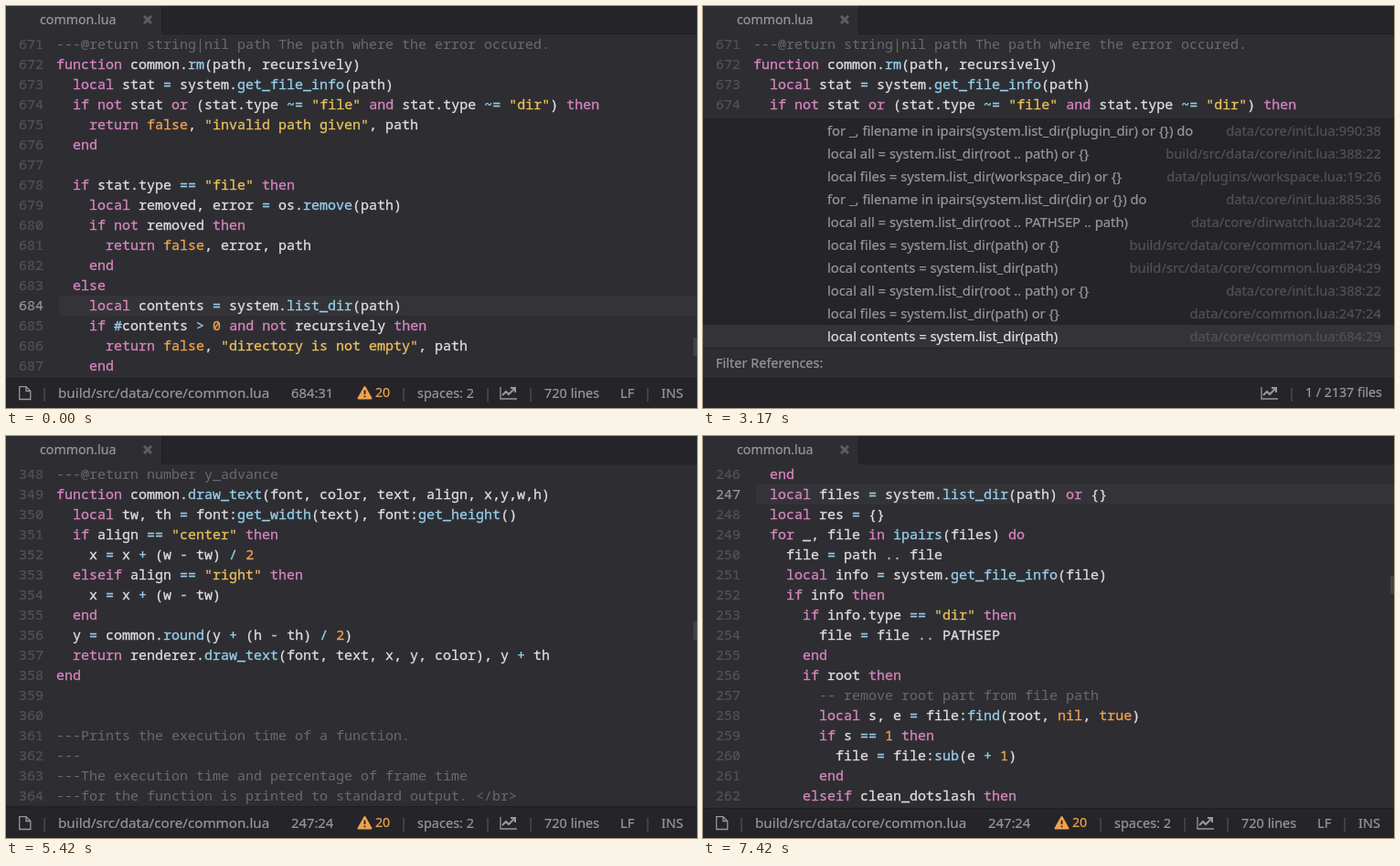
Write an HTML page that moves like this. It is 756x440 px and loops after 7500 ms.

```html
<!DOCTYPE html>
<html lang="en">
<head>
<meta charset="utf-8">
<title>Find references in a code editor</title>
<style>
  html, body { margin: 0; width: 100%; height: 100%; overflow: hidden; background: #2e2e32; }
  #stage { position: relative; width: 756px; height: 440px; overflow: hidden; background: #2e2e32;
    color: #97979c; font: 14.8px/20px "Noto Sans", "Open Sans", sans-serif; white-space: pre;
    -webkit-text-stroke-width: .2px; }
  #stage div, #stage svg, .at { position: absolute; }
  #view { left: 0; top: 31px; width: 756px; height: 376px; overflow: hidden; }
  #doc { left: 0; top: 0; width: 756px; font: 15px/20px "Noto Sans Mono", "DejaVu Sans Mono", monospace; color: #dedee3; }
  .num { left: 14px; color: #525259; }
  .num.on { color: #97979c; }
  .code { left: 55px; -webkit-text-stroke-width: .3px; }
  .band { left: 58px; right: 0; height: 22px; background: #343438; }
  .caret { width: 2px; height: 20px; background: #93ddfa; }
  .comment { color: #676b6f; -webkit-text-stroke-width: 0; }
  .string { color: #ecc05c; } .keyword { color: #d985c0; }
  .literal { color: #f0a34e; } .call, .op { color: #97cfec; }
  #thumb { right: 0; width: 4px; height: 20px; background: #414146; }
  #tabs { left: 0; top: 0; width: 756px; height: 31px; background: #252529; box-shadow: inset 0 -1px #202024; }
  #tab { left: 0; top: 0; width: 170px; height: 31px; background: #2e2e32; border-right: 1px solid #202024; font-size: 14.2px; }
  #list, #bar { left: 0; width: 756px; overflow: hidden; }
  #list { background: #252529; box-shadow: inset 0 1px #202024; }
  #rows { left: 0; bottom: 0; width: 756px; height: 250px; }
  #pick { left: 0; width: 756px; height: 25px; background: #343438; }
  .row { left: 136px; right: 14px; height: 25px; line-height: 24px; }
  .row.on { color: #e1e1e6; }
  .row .place { top: 0; right: 0; color: #525257; }
  #bar { background: #2e2e32; box-shadow: inset 0 1px #202024; }
  #label { left: 14px; top: 6px; font-size: 14.5px; }
  #query { left: 136px; top: 6px; color: #e1e1e6; }
  #query .caret { left: 100%; top: 0; height: 22px; }
  #status { left: 0; top: 407px; width: 756px; height: 33px; background: #252529; box-shadow: inset 0 1px #202024; }
  #status .at { top: 6px; }
  .sep { color: #525257; }
  svg { fill: none; stroke: #97979c; stroke-width: 1.5; }
</style>
</head>
<body>
<div id="stage">
  <div id="view"><div id="doc"></div><div id="thumb"></div></div>
  <div id="tabs"><div id="tab">
    <span class="at" style="left:37px;top:5px">common.lua</span>
    <svg style="left:150px;top:10px;stroke:#5d5d62;stroke-width:3" width="10" height="10"><path d="M1 1 9 9M9 1 1 9"/></svg>
  </div></div>
  <div id="list"><div id="rows"><div id="pick"></div></div></div>
  <div id="bar">
    <div id="label">Filter References:</div>
    <div id="query"><span id="typed"></span><div class="caret" id="barCaret"></div></div>
  </div>
  <div id="status"><div id="fileInfo"></div><div id="searchInfo"></div></div>
</div>
<script>
const LOOP = 7500, FPS = 12, TAU = 47, LINE = 22, ROW = 25;
const OPEN = 2800, CLOSE = 5275, JUMP = 5349.6;
const FIRST = 246, LAST = 671;
const BLINK = 667;
// [time, selected row]
const PRESSES = [[3640, 8], [3850, 7], [4060, 6], [4300, 5], [4490, 4], [4740, 5]];
// caret phases in the first view: [on, off]
const CARET_ON = [[500, 830], [1830, 2170], [2500, 2830]];

const CODE = {
246: `  end
  local files = system.list_dir(path) or {}
  local res = {}
  for _, file in ipairs(files) do
    file = path .. file
    local info = system.get_file_info(file)
    if info then
      if info.type == "dir" then
        file = file .. PATHSEP
      end
      if root then
        -- remove root part from file path
        local s, e = file:find(root, nil, true)
        if s == 1 then
          file = file:sub(e + 1)
        end
      elseif clean_dotslash then
        -- remove added dot slash
        local s, e = file:find("." .. PATHSEP, nil, true)
        if s == 1 then
          file = file:sub(e + 1)
        end
      end
      if file:lower():find(text:lower(), nil, true) == 1 then
        table.insert(res, file)
      end
    end
  end
  return res
end


---Returns a list of directories that are related to a path.
---@param text string The input path.
---@param root string The root directory.
---@return string[]
function common.dir_path_suggest(text, root)`,
348: `---@return number y_advance
function common.draw_text(font, color, text, align, x,y,w,h)
  local tw, th = font:get_width(text), font:get_height()
  if align == "center" then
    x = x + (w - tw) / 2
  elseif align == "right" then
    x = x + (w - tw)
  end
  y = common.round(y + (h - th) / 2)
  return renderer.draw_text(font, text, x, y, color), y + th
end


---Prints the execution time of a function.
---
---The execution time and percentage of frame time
---for the function is printed to standard output. </br>`,
671: `---@return string|nil path The path where the error occured.
function common.rm(path, recursively)
  local stat = system.get_file_info(path)
  if not stat or (stat.type ~= "file" and stat.type ~= "dir") then
    return false, "invalid path given", path
  end

  if stat.type == "file" then
    local removed, error = os.remove(path)
    if not removed then
      return false, error, path
    end
  else
    local contents = system.list_dir(path)
    if #contents > 0 and not recursively then
      return false, "directory is not empty", path
    end`
};

const RESULTS = [
  ["for _, filename in ipairs(system.list_dir(plugin_dir) or {}) do", "data/core/init.lua:990:38"],
  ["local all = system.list_dir(root .. path) or {}", "build/src/data/core/init.lua:388:22"],
  ["local files = system.list_dir(workspace_dir) or {}", "data/plugins/workspace.lua:19:26"],
  ["for _, filename in ipairs(system.list_dir(dir) or {}) do", "data/core/init.lua:885:36"],
  ["local all = system.list_dir(root .. PATHSEP .. path)", "data/core/dirwatch.lua:204:22"],
  ["local files = system.list_dir(path) or {}", "build/src/data/core/common.lua:247:24"],
  ["local contents = system.list_dir(path)", "build/src/data/core/common.lua:684:29"],
  ["local all = system.list_dir(root .. path) or {}", "data/core/init.lua:388:22"],
  ["local files = system.list_dir(path) or {}", "data/core/common.lua:247:24"],
  ["local contents = system.list_dir(path)", "data/core/common.lua:684:29"]
];

const TOKENS = new RegExp([
  '(?<comment>--.*)', '(?<string>"[^"]*")',
  '(?<keyword>\\b(?:function|local|if|not|or|and|then|return|end|else|elseif|for|in|do)\\b)',
  '(?<literal>\\b(?:false|true|nil|\\d+)\\b)', '(?<call>\\w+(?=\\())', '(?<op>~=|\\.\\.|[=><+\\-/#]+)'
].join('|'), 'g');

const $ = id => document.getElementById(id);

function add(parent, tag, className, text = '', style = {}) {
  const el = document.createElement(tag);
  el.className = className;
  el.textContent = text;
  Object.assign(el.style, style);
  parent.append(el);
  return el;
}

function highlight(parent, line) {
  let at = 0;
  for (const m of line.matchAll(TOKENS)) {
    parent.append(line.slice(at, m.index));
    const kind = Object.keys(m.groups).find(k => m.groups[k]);
    add(parent, 'span', kind, m[0]);
    at = m.index + m[0].length;
  }
  parent.append(line.slice(at));
}

const lineTop = n => (n - FIRST) * LINE;

function addCaret(line, column) {
  return add($('doc'), 'div', 'caret', '', { left: 54 + 9 * (column - 1) + 'px', top: lineTop(line) + 'px' });
}

for (const n of [247, 684]) add($('doc'), 'div', 'band', '', { top: lineTop(n) + 'px' });
for (const [start, block] of Object.entries(CODE)) {
  block.split('\n').forEach((line, i) => {
    const n = +start + i, style = { top: lineTop(n) + 'px' };
    add($('doc'), 'div', n === 247 || n === 684 ? 'num on' : 'num', n, style);
    highlight(add($('doc'), 'div', 'code', '', style), line);
  });
}
const carets = { before: addCaret(684, 31), after: addCaret(247, 24) };

const rows = RESULTS.map(([text, place], i) => {
  const row = add($('rows'), 'div', 'row', text, { top: i * ROW + 'px' });
  add(row, 'div', 'place', place);
  return row;
});

// Status bar
function label(parent, x, text, className = '', style = {}) {
  return add(parent, 'span', 'at ' + className, text, { left: x + 'px', ...style });
}
function icon(parent, x, path) {
  parent.insertAdjacentHTML('beforeend',
    `<svg style="left:${x}px;top:8px" width="20" height="18">${path}</svg>`);
}
const CHART = '<path d="M1 2V15H19" stroke-width="1.3"/><path d="M3 11 7 7 10 10 16 4M12 3H17V8" stroke-width="2"/>';
const info = $('fileInfo'), search = $('searchInfo');
icon(info, 13, '<path d="M1.7 1.7H9L13.8 6.5V15.5H1.7ZM9 1.7V6.5H13.8" stroke-width="1.3"/>');
icon(info, 384, '<path d="M8.5 2 15.5 14.5H1.5Z" fill="#f0a34e" stroke="#f0a34e" stroke-width="2" stroke-linejoin="round"/>' +
  '<path d="M8.5 5.5V10M8.5 11.5V13.3" stroke="#252529" stroke-width="1.8"/>');
icon(info, 540, CHART);
icon(search, 610, CHART);
label(info, 57, 'build/src/data/core/common.lua', '', { fontSize: '15.2px' });
const position = label(info, 312, '');
label(info, 404, '20', '', { color: '#f0a34e', fontSize: '14.2px' });
label(info, 450, 'spaces: 2', '', { fontSize: '14.5px' });
label(info, 589, '720 lines', '', { fontSize: '14.5px' });
label(info, 672, 'LF');
label(info, 717, 'INS', '', { fontSize: '14.5px' });
for (const x of [38, 431, 523, 570, 698]) label(info, x, '|', 'sep');
label(search, 640, '|', 'sep');
label(search, 659, '1 / 2137 files', '', { fontSize: '14.2px' });

const decay = (dt, tau = TAU) => Math.exp(-Math.max(0, dt) / tau);
const show = (el, on) => { el.style.visibility = on ? 'visible' : 'hidden'; };
const blinkOn = dt => dt >= 0 && dt % BLINK < BLINK / 2;

function selection(t) {
  let pos = 9, target = 9, since = OPEN;
  for (const [time, row] of PRESSES) {
    if (t < time) break;
    pos = target + (pos - target) * decay(time - since);
    target = row;
    since = time;
  }
  return { target, since, y: (target + (pos - target) * decay(t - since)) * ROW };
}

function render(t) {
  const jumped = t >= CLOSE, searching = t >= OPEN && !jumped;

  const first = FIRST + (LAST - FIRST) * decay(t - JUMP);
  $('doc').style.transform = `translateY(${-Math.round(lineTop(t < JUMP ? LAST : first))}px)`;
  $('thumb').style.top = 122 + (first - FIRST) * 210 / (LAST - FIRST) + 'px';
  show(carets.before, CARET_ON.some(([on, off]) => t >= on && t < off));
  show(carets.after, blinkOn(t - 5600));

  const open = jumped ? decay(t - CLOSE, 30) : t >= OPEN ? 1 - decay(t - OPEN) : 0;
  const bar = Math.round(33 * open), list = Math.round(251 * open);
  $('bar').style.top = 407 - bar + 'px';
  $('bar').style.height = bar + 'px';
  $('list').style.top = 407 - bar - list + 'px';
  $('list').style.height = list + 'px';

  const { target, since, y } = selection(t);
  $('pick').style.top = Math.round(y) + 'px';
  rows.forEach((row, i) => row.classList.toggle('on', i === target));
  $('typed').textContent = since > OPEN ? RESULTS[target][0] : '';
  show($('barCaret'), searching && blinkOn(t - since));

  show(info, !searching);
  show(search, searching);
  position.textContent = jumped ? '247:24' : '684:31';
}

const start = performance.now();
function tick() {
  const t = (performance.now() - start) % LOOP;
  render(Math.floor((t + 4) * FPS / 1000) * 1000 / FPS % LOOP);
  requestAnimationFrame(tick);
}
tick();
</script>
</body>
</html>
```
